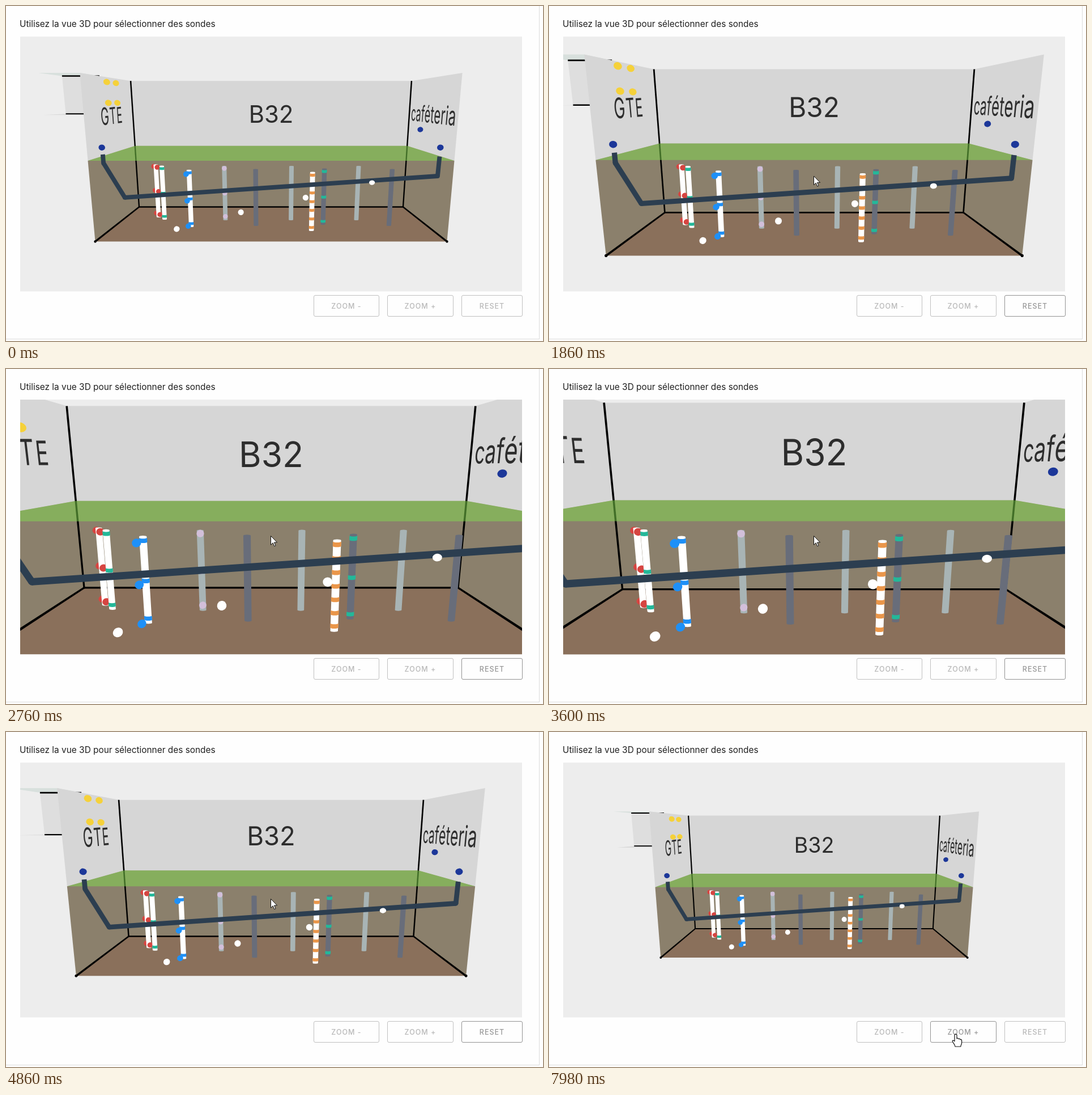
An HTML page with a canvas that plays this animation: 948x591 px, repeating every 8 s.

```html
<!DOCTYPE html>
<html lang="fr">
<head>
<meta charset="utf-8">
<title>Vue 3D</title>
<style>
  html, body { margin: 0; width: 100%; height: 100%; overflow: hidden; background: #fefefe; }
  body { position: relative; font-family: Inter, "Open Sans", sans-serif; }
  .frame { position: absolute; left: 0; top: 0; width: 941px; height: 587px;
    border: solid #dcdcdc; border-width: 0 1px 1px 0; }
  h1 { position: absolute; left: 24px; top: 20px; margin: 0; font-size: 15.4px; line-height: 23px;
    font-weight: 400; color: #1f1f1f; white-space: nowrap; }
  canvas { position: absolute; left: 0; top: 0; }
  .btn { position: absolute; top: 510px; height: 38px; box-sizing: border-box; border: 1px solid #c0c0c0;
    border-radius: 3px; color: #b8b8b8; font-size: 12.5px; font-weight: 500; letter-spacing: 1px;
    line-height: 38px; text-align: center; white-space: nowrap; }
  .btn.on { border-color: #939393; color: #989898; }
  svg { position: absolute; left: 0; top: 0; overflow: visible; }
</style>
</head>
<body>
<div class="frame"></div>
<h1>Utilisez la vue 3D pour sélectionner des sondes</h1>
<canvas id="view" width="948" height="591"></canvas>
<div class="btn" id="minus" style="left:543px;width:116px">ZOOM -</div>
<div class="btn" id="plus" style="left:673px;width:117px">ZOOM +</div>
<div class="btn" id="reset" style="left:804px;width:108px">RESET</div>
<svg id="cursor" width="24" height="26" fill="#fff" stroke="#111" stroke-linejoin="round">
  <path id="arrow" d="M.5 .5V16.2L4.2 12.7L6.7 18.6L9 17.6L6.5 11.9H11.6Z"/>
  <path id="hand" stroke-width="1.2" d="M-2 2C-2 -.6 2 -.6 2 2V8C2.4 6.8 5 7 5.2 8.7C6 7.8 8 8.2 8.2 9.7C9.2 9 10.6 9.6 10.6 11.4V15.5C10.6 18 8.8 19 8.8 22H-1C-1 19 -3.6 16.6 -5.6 13.2C-6.6 11.2 -4.2 10 -2 12.6Z"/>
</svg>
<script>
const LOOP = 8000, FOCAL = 618, PITCH = 9.9 * Math.PI / 180;
const COS = Math.cos(PITCH), SIN = Math.sin(PITCH);
const CX = 468, CY = 279;
const W = 1000, H = 930, D = 672, GROUND = 465;
const WHITE = '#fff', RED = '#d64541', TEAL = '#23b899', BLUE = '#1e90f7', LILAC = '#d2bfda';
const ORANGE = '#ea964a', YELLOW = '#f5d13a', NAVY = '#1c3799', PALE = '#a8b4b5', SLATE = '#686d7a';
const PIPE = '#2c3e50', WALL = '#d6d6d6', SOIL = '#8b806c', INK = '#2d2d2d';
const HIGH = 352, MID = 185, LOW = 23;

const $ = id => document.getElementById(id);
const ctx = $('view').getContext('2d');
let dolly = 0;

// Camera distance relative to the start
const zoomKeys = [[0, 0], [1560, 0], [1860, -.498], [2160, -.8], [2460, -.8], [2760, -1.262],
  [2940, -1.41], [3540, -1.41], [3600, -1.337], [4020, -1.044], [4440, -1.044], [4500, -.862],
  [4860, -.315], [5880, -.315], [5940, .055], [6000, .055], [6060, .473], [LOOP, .473]];
// Pointer: time, x, y
const pointerKeys = [[180, 948, 199], [1020, 467, 299.5], [2460, 467, 299.5], [2520, 467, 294],
  [4980, 467, 294], [5700, 575, 523], [7140, 575, 523], [7440, 718, 533], [LOOP, 718, 533]];

function track(keys, t, ease = k => k) {
  let i = 1;
  while (i < keys.length - 1 && t > keys[i][0]) i++;
  const a = keys[i - 1], b = keys[i];
  const k = ease(Math.min(1, Math.max(0, (t - a[0]) / (b[0] - a[0]))));
  return a.slice(1).map((v, n) => v + (b[n + 1] - v) * k);
}
const smooth = k => k * k * (3 - 2 * k);

function project(x, y, z) {
  const w = 4.292 + dolly - (SIN * y + COS * z) / FOCAL;
  return [CX + x / w, CY + (324 - COS * y + SIN * z) / w, 1 / w];
}

function face(color, ...points) {
  ctx.beginPath();
  for (const p of points) ctx.lineTo(...project(...p).slice(0, 2));
  ctx.closePath();
  ctx.fillStyle = color;
  ctx.fill();
}

function sphere(x, y, z, color, squash = 1, r = 16.5) {
  const [px, py, s] = project(x, y, z), dx = px - CX, dy = py - CY;
  ctx.beginPath();
  if (squash < 1) ctx.ellipse(px, py, r * s, r * s * squash, -.06, 0, 7);
  else ctx.ellipse(px, py, r * s * Math.hypot(1, Math.hypot(dx, dy) / FOCAL), r * s,
    Math.atan2(dy, dx), 0, 7);
  ctx.fillStyle = color;
  ctx.fill();
}

function tube(color, r, ...points) {
  const ps = points.map(p => project(...p));
  ctx.fillStyle = color;
  ps.forEach((a, i) => {
    const b = ps[i + 1];
    if (!b) return;
    const len = Math.hypot(b[0] - a[0], b[1] - a[1]);
    const nx = (a[1] - b[1]) / len * r, ny = (b[0] - a[0]) / len * r;
    ctx.beginPath();
    for (const [p, d] of [[a, 1], [b, 1], [b, -1], [a, -1]])
      ctx.lineTo(p[0] + nx * p[2] * d, p[1] + ny * p[2] * d);
    ctx.fill();
    if (i) joint(a, r);
  });
}

function joint(p, r) {
  ctx.beginPath();
  ctx.arc(p[0], p[1], r * p[2], 0, 7);
  ctx.fill();
}

function cylinder(x, z, y0, y1, r, color, band) {
  const [bx, by, bs] = project(x, y0, z), [tx, ty, ts] = project(x, y1, z);
  ctx.beginPath();
  ctx.ellipse(bx, by, r * bs, r * bs * .25, 0, 0, Math.PI);
  ctx.ellipse(tx, ty, r * ts, r * ts * .25, 0, Math.PI, band ? 0 : 2 * Math.PI, !!band);
  ctx.fillStyle = color;
  ctx.fill();
}

function pillar(x, z, color, bandColor, bands = []) {
  cylinder(x, z, 0, 365, 15, color);
  for (const y of bands) cylinder(x, z, y - 9, y + 9, 16, bandColor, true);
}

// Lays out text glyph by glyph so that it follows the wall in perspective
function wallText(text, size, y, place, tracking = 0) {
  ctx.font = `400 ${size}px Inter, "Open Sans", sans-serif`;
  ctx.textAlign = 'center';
  ctx.fillStyle = INK;
  const widths = [...text].map(c => ctx.measureText(c).width + tracking);
  let s = -widths.reduce((a, b) => a + b, 0) / 2;
  [...text].forEach((c, i) => {
    const w = widths[i], at = (u, v) => project(...place(u, v));
    const l = at(s, y), r = at(s + w, y), o = at(s + w / 2, y), up = at(s + w / 2, y + size);
    ctx.save();
    ctx.transform((r[0] - l[0]) / w, (r[1] - l[1]) / w,
      (o[0] - up[0]) / size, (o[1] - up[1]) / size, o[0], o[1]);
    ctx.fillText(c, 0, 0);
    ctx.restore();
    s += w;
  });
}

function drawRoom() {
  // Small annex on the left
  const ax = -1218, az = 460, ay = 712;
  face('#d8e0dd', [ax, H, az], [ax, H, D], [-W, H, D], [-W, H, az]);
  face('#dedede', [ax, H, az], [-W, H, az], [-W, ay, az], [ax, ay, az]);
  face('#d9d9d9', [ax, ay, az], [ax, ay, D], [-W, ay, D], [-W, ay, az]);
  tube('#000', 4, [ax, H, az], [-W, H, az]);
  tube('#000', 3.5, [ax, ay, az], [-W, ay, az]);

  for (const [color, y0, y1] of [[WALL, GROUND, H], [SOIL, 0, GROUND]]) {
    face(color, [-W, y0, 0], [W, y0, 0], [W, y1, 0], [-W, y1, 0]);
    for (const x of [-W, W]) face(color, [x, y0, 0], [x, y0, D], [x, y1, D], [x, y1, 0]);
  }
  face('#8a705b', [-W, 0, 0], [W, 0, 0], [W, 0, D], [-W, 0, D]);

  tube('#000', 5, [-W, 0, 0], [W, 0, 0]);
  for (const x of [-W, W]) {
    tube('#000', 5, [x, H, 0], [x, 0, 0], [x, 0, D]);
    joint(project(x, 0, D), 7);
  }
  face('rgba(129,220,79,.5)', [-W, GROUND, 0], [W, GROUND, 0], [W, GROUND, D], [-W, GROUND, D]);

  wallText('B32', 172, 635, (u, v) => [u, v, 0]);
  wallText('GTE', 143, 645, (u, v) => [-W, v, 336 - u], 8);
  wallText('caféteria', 145, 653, (u, v) => [W, v, 342 + u], 1);
}

function drawProbes() {
  for (const y of [887, 776]) for (const z of [507, 620]) sphere(-887, y, z, YELLOW);
  sphere(-943, 531, 620, NAVY);
  sphere(943, 531, 620, NAVY);
  sphere(938, 611, 352, NAVY);

  const levels = [HIGH, MID, LOW];
  for (const y of levels) sphere(-797, y, 218, RED);
  pillar(-777, 235, WHITE);
  for (const y of levels) sphere(-762, y, 253, RED);
  pillar(-722, 283, WHITE, TEAL, levels);
  pillar(-308, 294, PALE);
  for (const y of levels) sphere(-308, y, 294, LILAC, 1, 16);
  pillar(134, 294, PALE);
  pillar(575, 294, PALE);
  pillar(337, 384, SLATE, TEAL, levels);
  pillar(-97, 405, SLATE);
  pillar(758, 405, SLATE);
  pillar(-509, 426, WHITE, BLUE, levels);
  for (const y of levels) sphere(-514, y, 483, BLUE);
  pillar(249, 497, WHITE, ORANGE, Array.from({length: 7}, (_, i) => LOW + i * (HIGH - LOW) / 6));

  sphere(-548, 55, 620, WHITE);
  sphere(-174, 156, 620, WHITE);
  sphere(197, 243, 620, WHITE);
  tube(PIPE, 12.5, [-941, 492, 620], [-941, 443, 620], [-838, 242, 614], [936, 371, 630], [941, 481, 624]);
  sphere(572, 331, 620, WHITE, .8);
}

function render(now) {
  const t = Math.floor(now % LOOP / 60) * 60;
  [dolly] = track(zoomKeys, t);

  ctx.clearRect(0, 0, 948, 591);
  ctx.save();
  ctx.beginPath();
  ctx.rect(25, 54, 886, 449.5);
  ctx.clip();
  ctx.fillStyle = '#ededed';
  ctx.fillRect(25, 54, 886, 450);
  drawRoom();
  drawProbes();
  ctx.restore();

  const [x, y] = track(pointerKeys, t, smooth);
  const overButton = t > 5040 && y > 510;
  $('cursor').style.display = t < 240 ? 'none' : '';
  $('cursor').style.transform = `translate(${x}px, ${y}px)`;
  $('arrow').style.display = overButton ? 'none' : '';
  $('hand').style.display = overButton ? '' : 'none';
  $('reset').classList.toggle('on', t >= 300 && t < 5940);
  $('minus').classList.toggle('on', overButton && t < 7980);
  $('plus').classList.toggle('on', t > 7140 && x > 673);
}

const start = performance.now();
function tick() {
  render(performance.now() - start);
  requestAnimationFrame(tick);
}
tick();
</script>
</body>
</html>
```
